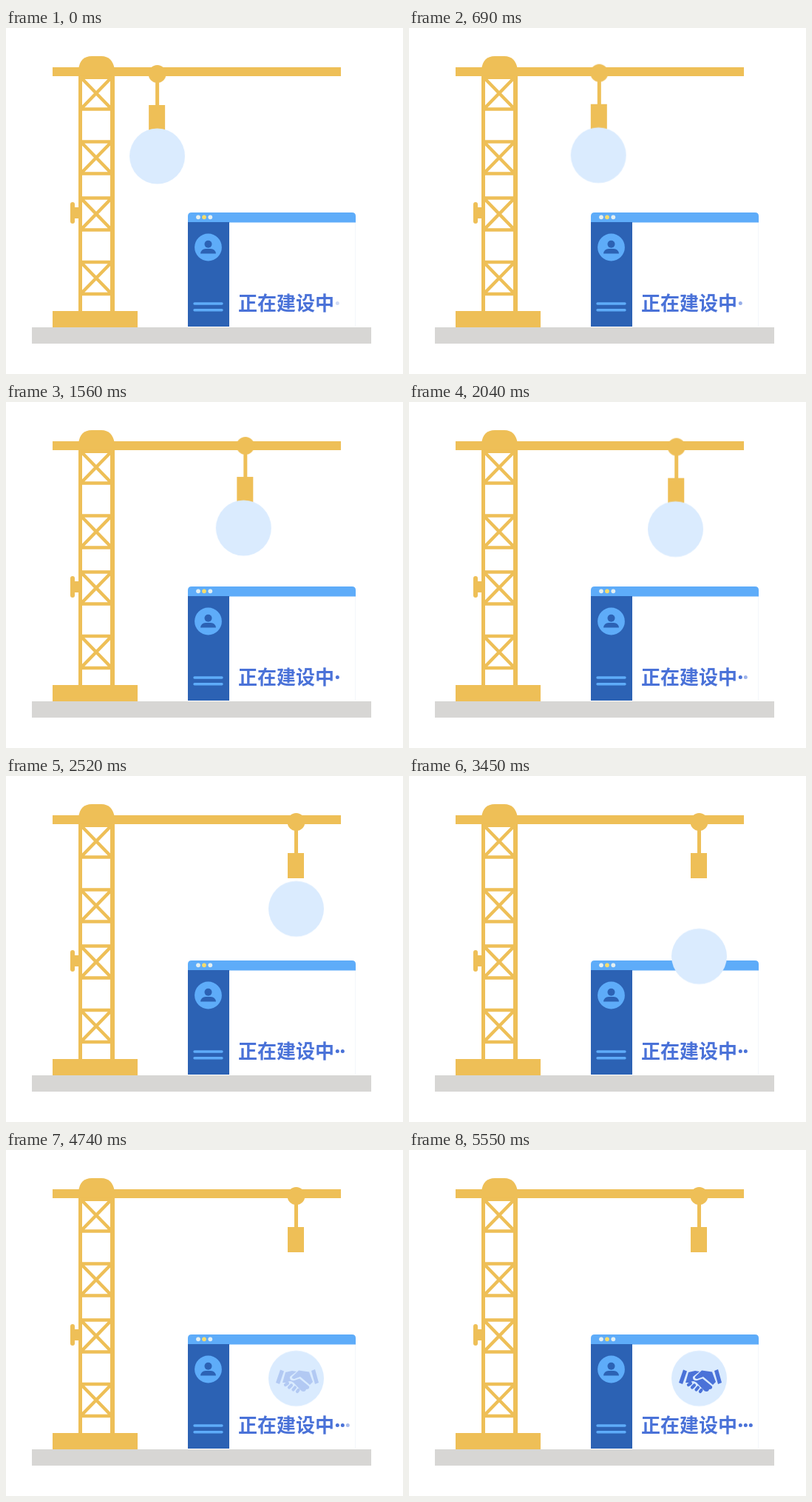
An HTML page without scripts that plays this animation: 537 by 467 pixels, repeating every 6180 ms.

```html
<!DOCTYPE html>
<html lang="zh">
<head>
<meta charset="utf-8">
<title>正在建设中</title>
<style>
  html, body { margin: 0; width: 100%; height: 100%; overflow: hidden; background: #fff; }
  svg { display: block; width: 537px; height: 467px; }
  .crane { fill: #eebf57; }
  .brace { fill: none; stroke: #eebf57; stroke-width: 4.5; }
  .sky { fill: #5eacf9; }
  .navy { fill: #2c62b4; }
  .ink { fill: #4a72d8; }
  .label { font: 700 26px "Noto Sans CJK SC", "Noto Sans CJK", sans-serif; }

  .trolley, .ball, .hands, .dot { animation: 6180ms linear infinite both; }
  .trolley { animation-name: roll; }
  .ball { animation-name: carry; }
  .hands { animation-name: reveal; }
  .dot1 { animation-name: dot1; }
  .dot2 { animation-name: dot2; }
  .dot3 { animation-name: dot3; }

  @keyframes roll {
    0% { transform: translate(0, 0); }
    25.73% { transform: translate(121.5px, -3px); }
    39.32%, 100% { transform: translate(188px, 0); }
  }
  @keyframes carry {
    0% { transform: translate(0, 0); }
    25.73% { transform: translate(119px, -3px); }
    39.32% { transform: translate(188px, 0); }
    71.36% { transform: translate(188px, 136.5px); }
    71.84%, 100% { transform: translate(188px, 135.3px); }
  }
  @keyframes reveal { 0%, 71.84% { opacity: 0; } 89.8%, 100% { opacity: 1; } }
  @keyframes dot1 { 0% { opacity: .25; } 25.73%, 100% { opacity: 1; } }
  @keyframes dot2 { 0%, 25.73% { opacity: 0; } 39.32%, 100% { opacity: 1; } }
  @keyframes dot3 { 0%, 65% { opacity: 0; } 89.8%, 100% { opacity: 1; } }
</style>
</head>
<body>
<svg viewBox="0 0 537 467">
  <defs>
    <path id="truss" class="brace" d="M100 0H144M100 43H144M102 1L142 42M142 1L102 42"/>
  </defs>

  <rect x="35" y="404" width="459" height="22" fill="#d7d6d4"/>

  <g class="crane">
    <rect x="63" y="53" width="390" height="12"/>
    <path d="M98 69V56Q100 38 116 38H129Q144 38 147 56V69Z"/>
    <rect x="98" y="60" width="5" height="324"/>
    <rect x="141" y="60" width="6" height="324"/>
    <rect x="63" y="382" width="115" height="22"/>
    <rect x="87" y="235" width="6" height="29" rx="3"/>
    <rect x="91" y="242" width="9" height="15"/>
  </g>
  <use href="#truss" y="66.5"/>
  <use href="#truss" y="153.5"/>
  <use href="#truss" y="229.5"/>
  <use href="#truss" y="316"/>

  <!-- browser window -->
  <path d="M472.5 262V403" stroke="#f4f6fb"/>
  <path class="sky" d="M246 262.5V254Q246 249 251 249H468Q473 249 473 254V262.5Z"/>
  <circle cx="260" cy="255.3" r="2.9" fill="#e4eff0"/>
  <circle cx="268" cy="255.3" r="2.9" fill="#f5dc6c"/>
  <circle cx="276.3" cy="255.3" r="2.9" fill="#e4eff0"/>
  <rect class="navy" x="246" y="262" width="56" height="141"/>
  <circle class="sky" cx="273.5" cy="296" r="18.4"/>
  <circle class="navy" cx="273.5" cy="291.8" r="5"/>
  <path class="navy" d="M263 304.5Q264 298 270 298H277Q283 298 284 304.5Z"/>
  <path d="M255 372H292M255 380.7H292" stroke="#5eacf9" stroke-width="3.4" stroke-linecap="round"/>

  <text class="ink label" x="314" y="381">正在建设中</text>
  <g class="ink">
    <circle class="dot dot1" cx="448.3" cy="371.5" r="2.5"/>
    <circle class="dot dot2" cx="455.3" cy="371.5" r="2.5"/>
    <circle class="dot dot3" cx="462.3" cy="371.5" r="2.5"/>
  </g>

  <g class="trolley crane">
    <circle cx="204.5" cy="62" r="12"/>
    <rect x="202" y="62" width="5" height="44"/>
    <rect x="193" y="104" width="22" height="34"/>
  </g>

  <circle class="ball" cx="204.5" cy="173" r="37.5" fill="#daebfe"/>

  <g class="hands ink">
    <path d="M371 296.5L376 298.5 370 316 365 314ZM413 298L418 296 423 314 418 316Z"/>
    <path d="M378 300L387 298 393 299 384 306Q383 312 390 311L397 308.5 410 319Q411 323 406 323 405 327 400 325.5L389 314Q384 310 380 314L374 314Z"/>
    <path d="M396 297.5L410 299.5 415 313 411 317 398 306 390 309Q386 309 387 306Z"/>
    <path d="M378 317L381 315M383 320.5L386 317.5M388.5 323.5L391 320.5M394 326L395.5 324" fill="none" stroke="#4a72d8" stroke-width="4.2" stroke-linecap="round"/>
  </g>
</svg>
</body>
</html>
```
